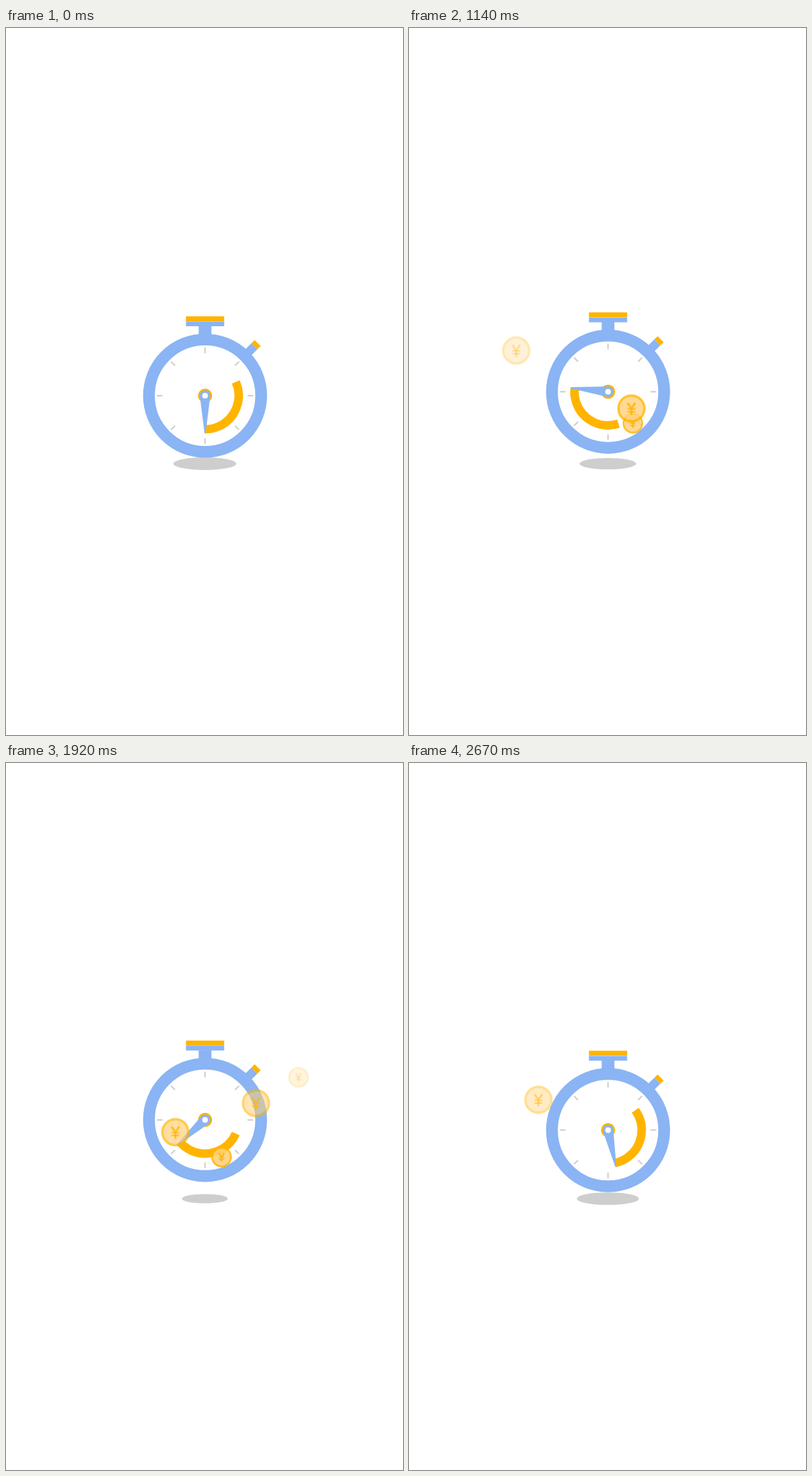
Animation of 561 by 998 pixels, one loop 2700 ms. Source, as an HTML page with a canvas:

```html
<!DOCTYPE html>
<html lang="en">
<head>
<meta charset="utf-8">
<title>Stopwatch</title>
<style>
  html, body { margin: 0; width: 100%; height: 100%; overflow: hidden; background: #fff; }
  canvas { display: block; }
</style>
</head>
<body>
<canvas id="stage" width="561" height="998"></canvas>
<script>
const ctx = document.getElementById('stage').getContext('2d');
const LOOP = 2700, STEP = 30, BOUNCE = 1350, TURN = 900;
const BLUE = '#8ab4f3', YELLOW = '#ffb400', GREY = '#cecece', PALE = '#ffd07a';
const CX = 281.3, CY = 519;
const RAD = Math.PI / 180;

// Quadratic flight paths: start, control, end
const bigRight = [[291, 600], [330, 460], [428, 438]];
const bigLeft = [[285, 575], [235, 500], [125, 440]];
const smallRight = [[295, 590], [325, 460], [421, 442]];
const smallLow = [[300, 592], [335, 504], [405, 487]];
const smallLeft = [[280, 570], [235, 507], [140, 448]];

const coins = [
  { path: smallLow, start: 1030, life: 520, r: 14.5 },
  { path: smallRight, start: 1421, life: 520, r: 14.5 },
  { path: smallRight, start: 1848, life: 520, r: 14.5 },
  { path: smallLeft, start: 1968, life: 520, r: 14.5 },
  { path: bigRight, start: 132, life: 530, r: 20 },
  { path: bigLeft, start: 692, life: 512, r: 20 },
  { path: bigRight, start: 1007, life: 530, r: 20 },
  { path: bigRight, start: 1623, life: 530, r: 20 },
  { path: bigLeft, start: 1729, life: 512, r: 20 },
  { path: bigLeft, start: 2304, life: 512, r: 20 }
];

function disc(x, y, r, color) {
  ctx.fillStyle = color;
  ctx.beginPath();
  ctx.arc(x, y, r, 0, Math.PI * 2);
  ctx.fill();
}

function ring(r, width, color, from = 0, to = Math.PI * 2) {
  ctx.strokeStyle = color;
  ctx.lineWidth = width;
  ctx.beginPath();
  ctx.arc(0, 0, r, from, to);
  ctx.stroke();
}

function rect(x, y, w, h, color) {
  ctx.fillStyle = color;
  ctx.fillRect(x, y, w, h);
}

function rotated(angle, draw) {
  ctx.save();
  ctx.rotate(angle);
  draw();
  ctx.restore();
}

function drawShadow(lift) {
  const s = 1 - 0.32 * lift;
  ctx.fillStyle = GREY;
  ctx.beginPath();
  ctx.ellipse(281, 615, 44.5 * s, 9 * s, 0, 0, Math.PI * 2);
  ctx.fill();
}

function drawHand(angle) {
  // The sweep trails the hand
  ring(47.5, 12, YELLOW, angle - 204 * RAD, angle - 90 * RAD);
  disc(0, 0, 10, YELLOW);
  rotated(angle, () => {
    disc(0, 0, 7.5, BLUE);
    ctx.beginPath();
    ctx.moveTo(-7.4, 0);
    ctx.lineTo(-0.8, -53);
    ctx.lineTo(0.8, -53);
    ctx.lineTo(7.4, 0);
    ctx.fill();
  });
  disc(0, 0, 4, '#fff');
}

function drawWatch(lift, angle) {
  ctx.save();
  ctx.translate(CX, CY - 18 * lift);
  rect(-27, -112, 54, 7, YELLOW);
  rect(-27, -104.7, 54, 6.7, BLUE);
  rect(-9, -98.5, 18, 16, BLUE);
  rotated(45 * RAD, () => {
    rect(-6, -98.5, 12, 16, BLUE);
    rect(-6, -105, 12, 6.5, YELLOW);
  });
  disc(0, 0, 72, '#fff');
  ring(79.3, 16.6, BLUE);
  for (let i = 0; i < 8; i++) {
    rotated(i * 45 * RAD, () => rect(-1, -68, 2, 8, GREY));
  }
  drawHand(angle);
  ctx.restore();
}

function drawYen() {
  ctx.strokeStyle = YELLOW;
  ctx.lineWidth = 3;
  ctx.beginPath();
  ctx.moveTo(-5.5, -8);
  ctx.lineTo(0, 0);
  ctx.lineTo(5.5, -8);
  ctx.moveTo(0, -0.5);
  ctx.lineTo(0, 9);
  ctx.stroke();
  ctx.lineWidth = 2;
  ctx.beginPath();
  ctx.moveTo(-5.5, 0.5);
  ctx.lineTo(5.5, 0.5);
  ctx.moveTo(-5.5, 4.5);
  ctx.lineTo(5.5, 4.5);
  ctx.stroke();
}

function drawCoin({ path: [a, b, c], start, life, r }, time) {
  const p = (time - start) / life;
  if (p < 0 || p >= 1) return;
  const q = 1 - p;
  const at = i => q * q * a[i] + 2 * p * q * b[i] + p * p * c[i];
  ctx.save();
  ctx.globalAlpha = 1 - 0.8 * p;
  ctx.translate(at(0), at(1));
  ctx.scale(r / 20, r / 20);
  disc(0, 0, 16.5, PALE);
  ring(18.2, 3.6, YELLOW);
  drawYen();
  ctx.restore();
}

function render(now) {
  const time = Math.floor((now % LOOP) / STEP) * STEP;
  const lift = 1 - Math.abs(1 - (time % BOUNCE) / (BOUNCE / 2));
  ctx.fillStyle = '#fff';
  ctx.fillRect(0, 0, 561, 998);
  drawShadow(lift);
  drawWatch(lift, Math.PI + time / TURN * Math.PI * 2);
  coins.forEach(coin => drawCoin(coin, time));
}

let origin;
function tick(now) {
  origin ??= now;
  render(now - origin);
  requestAnimationFrame(tick);
}
render(0);
requestAnimationFrame(tick);
</script>
</body>
</html>
```
